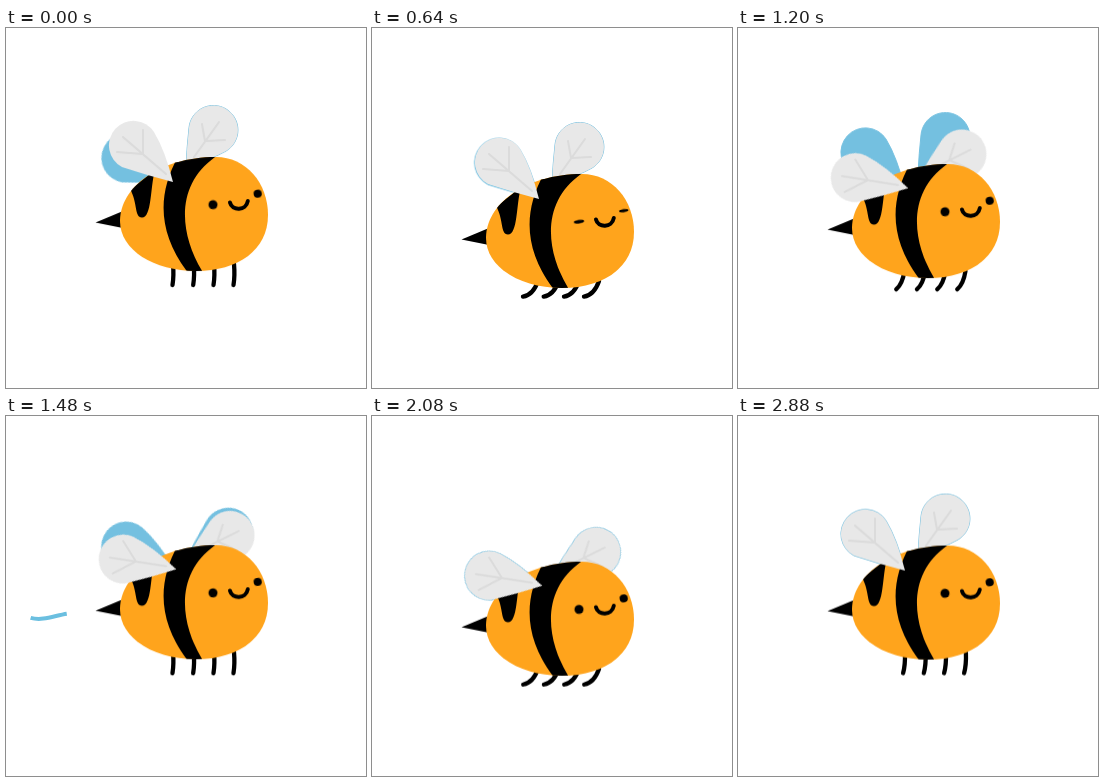
An HTML page for the animation above (2.92 s loop, 360 px wide and 360 px high).

```html
<!DOCTYPE html>
<html lang="en">
<head>
<meta charset="utf-8">
<title>Flying bee</title>
<style>
  :root { --loop: 2920ms; }
  html, body { margin: 0; width: 100%; height: 100%; overflow: hidden; background: #fff; }
  svg { display: block; width: 100%; height: 100%; }

  /* Two bobs, nine wing beats and one blink per loop */
  .bee { animation: bob calc(var(--loop) / 2) infinite; }
  @keyframes bob {
    0% { transform: none; animation-timing-function: cubic-bezier(.33, .1, .6, .95); }
    50% { transform: translateY(17.7px); animation-timing-function: cubic-bezier(.4, 0, .7, .85); }
    100% { transform: none; }
  }

  .legs { fill: none; stroke: #000; stroke-width: 4.3; stroke-linecap: round; }
  .leg { animation: bend calc(var(--loop) / 2) infinite; }
  @keyframes bend {
    0%, 100% { d: path("M167 236Q168 248 166.5 257"); animation-timing-function: ease-in-out; }
    50% { d: path("M166 236Q161 250 150.5 251.5"); animation-timing-function: ease-in; }
  }

  .left { --down: -32deg; --lead: -65ms; transform-origin: 167px 148px; }
  .right { --down: 28deg; --lead: -50ms; transform-origin: 181px 144px; }
  .wing { fill: #e8e8e8; animation: flap calc(var(--loop) / 9) linear infinite; }
  .ghost { fill: #74c0e0; stroke: #74c0e0; stroke-width: 1; animation-delay: var(--lead); }
  .vein { fill: none; stroke: #dbdbdb; stroke-width: 2; stroke-linecap: round; }
  @keyframes flap {
    0%, 17.5%, 84%, 100% { transform: none; }
    23%, 70% { transform: rotate(var(--down)); }
  }

  .eye { animation: blink var(--loop) linear infinite; }
  @keyframes blink {
    0%, 18%, 26%, 100% { transform: none; }
    21%, 23% { transform: scale(1.15, .42); }
  }

  .streak {
    fill: none; stroke: #6bbfe0; stroke-width: 4;
    stroke-dasharray: 60 300;
    animation: sweep var(--loop) var(--start) linear infinite backwards;
  }
  .low { --start: -2160ms; }
  .mid { --start: -1640ms; }
  .high { --start: -560ms; }
  @keyframes sweep {
    0% { stroke-dashoffset: 62; }
    12%, 100% { stroke-dashoffset: -102; }
  }
</style>
</head>
<body>
<svg viewBox="0 0 360 360">
  <defs>
    <path id="body" d="M210 129C240 129 262 155 262 187C262 222 232 243 190 243C148 243 114 222 114 193C114 160 152 129 210 129Z"/>
    <clipPath id="inside"><use href="#body"/></clipPath>
    <path id="leftWing" d="M167 154Q159 122 148 104A24.5 24.5 0 1 0 116 139Q140 147 167 154Z"/>
    <path id="rightWing" d="M180 138Q181 118 183 100A24.5 24.5 0 1 1 220 123Q206 131 180 138Z"/>
  </defs>

  <path class="streak low" pathLength="100" d="M88 258C58 262 36 280 17 315"/>
  <path class="streak mid" pathLength="100" d="M80 200C60 190 40 210 20 200"/>
  <path class="streak high" pathLength="100" d="M92 76C62 82 38 78 22 30"/>

  <g class="bee">
    <use class="wing ghost right" href="#rightWing"/>
    <use class="wing ghost left" href="#leftWing"/>
    <g class="wing right">
      <use href="#rightWing"/>
      <path class="vein" d="M188 129L213 94M199 113L196 96M199 113L219 112"/>
    </g>

    <g class="legs">
      <path class="leg"/>
      <g transform="translate(20.7)"><path class="leg"/></g>
      <g transform="translate(41)"><path class="leg"/></g>
      <g transform="translate(61)"><path class="leg"/></g>
    </g>

    <path d="M89.5 194.5L117 183V200Z"/>
    <use href="#body" fill="#ffa41c"/>
    <g clip-path="url(#inside)">
      <path d="M173 127C151 165 151 205 183 246H198C172 205 169 155 212 127Z"/>
      <path d="M120 165L149 142C144 160 146 189.5 136 189.5C128 189 132 175 124 161Z"/>
    </g>

    <g transform="translate(207 176.7) rotate(-8)"><circle class="eye" r="4.5"/></g>
    <g transform="translate(251.7 165.7) rotate(-8)"><circle class="eye" r="4.1"/></g>
    <path d="M224 174.5C226 183 240 183 241.800 173" fill="none" stroke="#000" stroke-width="4" stroke-linecap="round"/>

    <g class="wing left">
      <use href="#leftWing"/>
      <path class="vein" d="M160 146L117 109M137 126L137 102M137 126L111 124"/>
    </g>
  </g>
</svg>
</body>
</html>
```
